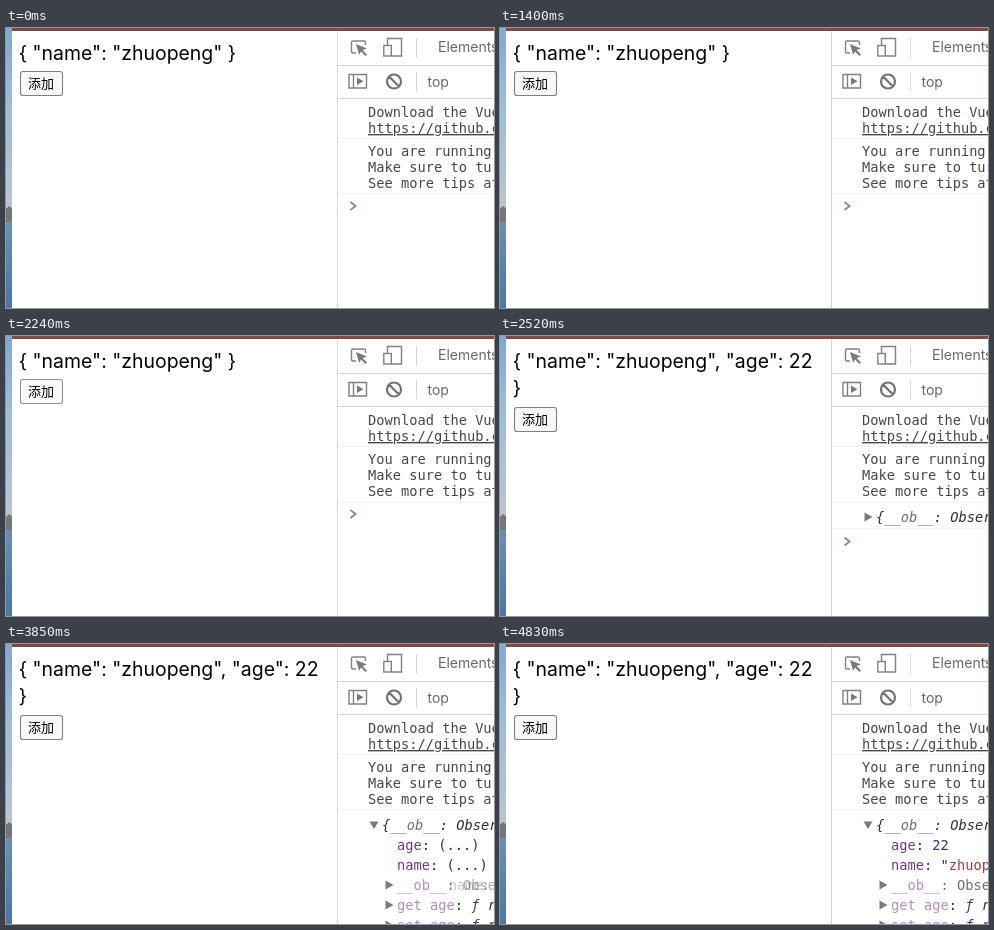
An HTML page that plays this animation: 488 px wide and 280 px high, repeating every 5.25 s.

```html
<!DOCTYPE html>
<html lang="zh">
<head>
<meta charset="utf-8">
<title>Reactive property demo</title>
<style>
  html, body { margin: 0; width: 100%; height: 100%; overflow: hidden; background: #fff; }
  svg { display: block; width: 488px; height: 280px; }
  text { white-space: pre; }

  .page { font: 19.45px Inter, sans-serif; fill: #000; }
  .label { font: 13px "Noto Sans CJK SC", "Noto Sans CJK", sans-serif; fill: #000; }
  .tools { font: 14px Inter, sans-serif; fill: #66696c; }
  .console { font: 13.7px "DejaVu Sans Mono", monospace; fill: #474747; }
  .icon { fill: none; stroke: #808080; stroke-width: 1.4; }
  .ban { fill: none; stroke: #727272; stroke-width: 2.2; }
  .solid { fill: #7a7a7a; }
  .rule { stroke: #d6d6d6; }
  .row { stroke: #f0f0f0; }
  .prompt { fill: none; stroke: #6a8fc4; stroke-width: 1.8; }
  .italic { font-style: italic; }
  .key { fill: #733a78; }
  .dim { fill: #b08fb4; }
  .grey { fill: #707070; }
  .dark { fill: #303030; }
  .num { fill: #2c2a8c; }
  .str { fill: #a33c36; }
  .fn { fill: #35387f; font-style: italic; }

  /* One 5250 ms loop; hard state changes use step-end. */
  .t { animation: 5250ms step-end infinite; }
  .empty { animation-name: empty; }
  .added { animation-name: added; }
  .closed { animation-name: closed; }
  .open { animation-name: open; }
  .unread { animation-name: unread; }
  .read { animation-name: read; }
  .hover { animation-name: hover; }
  .button { animation-name: shift; }
  .face { fill: #f8f8f8; stroke: #808080; stroke-width: 1.1; animation-name: press; }
  .drag { animation: drag 5250ms linear infinite; }

  @keyframes empty { 0% { visibility: visible } 44%, 100% { visibility: hidden } }
  @keyframes added { 0% { visibility: hidden } 44%, 100% { visibility: visible } }
  @keyframes closed { 0% { visibility: hidden } 44% { visibility: visible } 64%, 100% { visibility: hidden } }
  @keyframes open { 0% { visibility: hidden } 64%, 100% { visibility: visible } }
  @keyframes unread { 0% { visibility: hidden } 64% { visibility: visible } 84%, 100% { visibility: hidden } }
  @keyframes read { 0% { visibility: hidden } 84%, 100% { visibility: visible } }
  @keyframes hover { 0% { visibility: hidden } 80% { visibility: visible } 84%, 100% { visibility: hidden } }
  @keyframes shift { 0% { transform: none } 44%, 100% { transform: translateY(28px) } }
  @keyframes press {
    0% { fill: #f8f8f8; stroke: #808080 }
    37.333% { fill: #efefef; stroke: #606060 }
    42.667% { fill: #fafafa; stroke: #929292 }
    44% { fill: #efefef; stroke: #606060 }
    48%, 100% { fill: #f8f8f8; stroke: #808080 }
  }
  @keyframes drag {
    0%, 69.332% { opacity: 0; transform: translate(92px, 46px) }
    69.333% { opacity: .4; transform: translate(92px, 46px) }
    73.333% { opacity: .4; transform: translate(52px, 20px) }
    78.666% { opacity: .4; transform: translate(2px, 0) }
    78.667%, 100% { opacity: 0; transform: none }
  }
</style>
</head>
<body>
<svg viewBox="0 0 488 280">
  <defs>
    <linearGradient id="sky" x2="0" y2="1">
      <stop offset="0" stop-color="#7fa8d2"/>
      <stop offset=".4" stop-color="#9dbcdb"/>
      <stop offset="1" stop-color="#bcc4d2"/>
    </linearGradient>
    <linearGradient id="water" x2="0" y2="1">
      <stop offset="0" stop-color="#6a90b4"/>
      <stop offset="1" stop-color="#4a78a4"/>
    </linearGradient>
    <path id="right" class="solid" d="M0 -4.5 L8 0 L0 4.5Z"/>
    <path id="down" class="solid" d="M0 -3.5 H9 L4.5 4Z"/>
    <path id="chevron" class="prompt" d="M0 -4 L5 0 L0 4"/>
  </defs>

  <!-- desktop edge and window -->
  <rect width="7" height="182" fill="url(#sky)"/>
  <rect y="192" width="7" height="88" fill="url(#water)"/>
  <path d="M0 181 L3 178 L7 181 V194 H0Z" fill="#77757c"/>
  <rect x="6" width="482" height="280" fill="#fff"/>
  <rect x="6" width="482" height="3" fill="#824846"/>

  <!-- page -->
  <g class="page">
    <text class="t empty" x="12.8" y="32">{ "name": "zhuopeng" }</text>
    <g class="t added">
      <text x="12.8" y="32">{ "name": "zhuopeng", "age": 22</text>
      <text x="12.8" y="59">}</text>
    </g>
  </g>
  <g class="t button">
    <rect class="t face" x="14.5" y="43.5" width="42" height="24" rx="2.6"/>
    <text class="label" x="22" y="60">添加</text>
  </g>

  <!-- developer tools -->
  <path class="rule" d="M331.5 3 V280 M332 37.5 H488 M332 70.5 H488 M410.5 10 V30 M410.5 44 V63"/>
  <g class="icon">
    <path d="M350 25 H347 Q345.5 25 345.5 23.5 V14.5 Q345.5 13 347 13 H358 Q359.5 13 359.5 14.5 V17"/>
    <path d="M381.5 17 V10.5 H395.5 V28 H386"/>
    <rect x="377.8" y="17.5" width="7.5" height="10.5"/>
    <path d="M343 46.5 H360.5 V60 H343Z M347.5 46.5 V60"/>
  </g>
  <path class="ban" d="M381 53.5 a7 7 0 1 1 14 0 a7 7 0 1 1 -14 0 M383 48.5 L393 58.5"/>
  <path class="solid" d="M350 16 L361 20.5 L356.6 22 L361 26.4 L359.4 28 L355 23.6 L353.2 27Z M351 49.5 L357.5 53.3 L351 57Z"/>
  <g class="tools">
    <text x="432" y="24">Elements</text>
    <text x="421.5" y="59">top</text>
  </g>

  <!-- console -->
  <path class="row" d="M332 110.5 H488 M332 166 H488"/>
  <g class="console">
    <text x="362" y="89">Download the Vue</text>
    <text x="362" y="105" text-decoration="underline">https://github.com</text>
    <text x="362" y="128">You are running</text>
    <text x="362" y="144">Make sure to turn</text>
    <text x="362" y="160">See more tips at</text>

    <use class="t empty" href="#chevron" x="344.5" y="178"/>
    <text class="t added italic dark" x="376" y="186">{<tspan class="grey">__ob__</tspan>: Observer}</text>

    <g class="t closed">
      <use href="#right" x="364.5" y="181"/>
      <path class="row" d="M332 192.5 H488"/>
      <use href="#chevron" x="344.5" y="205.5"/>
    </g>

    <g class="t open">
      <use href="#down" x="363.5" y="181"/>
      <text class="dark" x="391" y="206"><tspan class="key">age</tspan>:</text>
      <text class="dark" x="391" y="226"><tspan class="key">name</tspan>:</text>
      <use href="#right" x="379.5" y="241"/>
      <text class="grey" x="391" y="246"><tspan class="dim">__ob__</tspan>: Observer</text>
      <use href="#right" x="379.5" y="261"/>
      <text class="dark" x="391" y="266"><tspan class="dim">get age</tspan>: <tspan class="fn">ƒ</tspan> <tspan class="italic">reactiveGetter()</tspan></text>
      <use href="#right" x="379.5" y="281"/>
      <text class="dark" x="391" y="286"><tspan class="dim">set age</tspan>: <tspan class="fn">ƒ</tspan> <tspan class="italic">reactiveSetter()</tspan></text>
    </g>
    <g class="t unread dark">
      <text x="432.3" y="206">(...)</text>
      <text x="440.5" y="226">(...)</text>
    </g>
    <path class="t hover" d="M433 208 H474" stroke="#303030"/>
    <g class="t read">
      <text class="num" x="432.3" y="206">22</text>
      <text class="dark" x="440.5" y="226">"<tspan class="str">zhuopeng</tspan>"</text>
    </g>

    <!-- drag image sliding back to its row -->
    <g class="drag">
      <rect x="391" y="214" width="92" height="16" fill="#fff"/>
      <text class="grey" x="391" y="226">name: (...)</text>
    </g>
  </g>
</svg>
</body>
</html>
```
